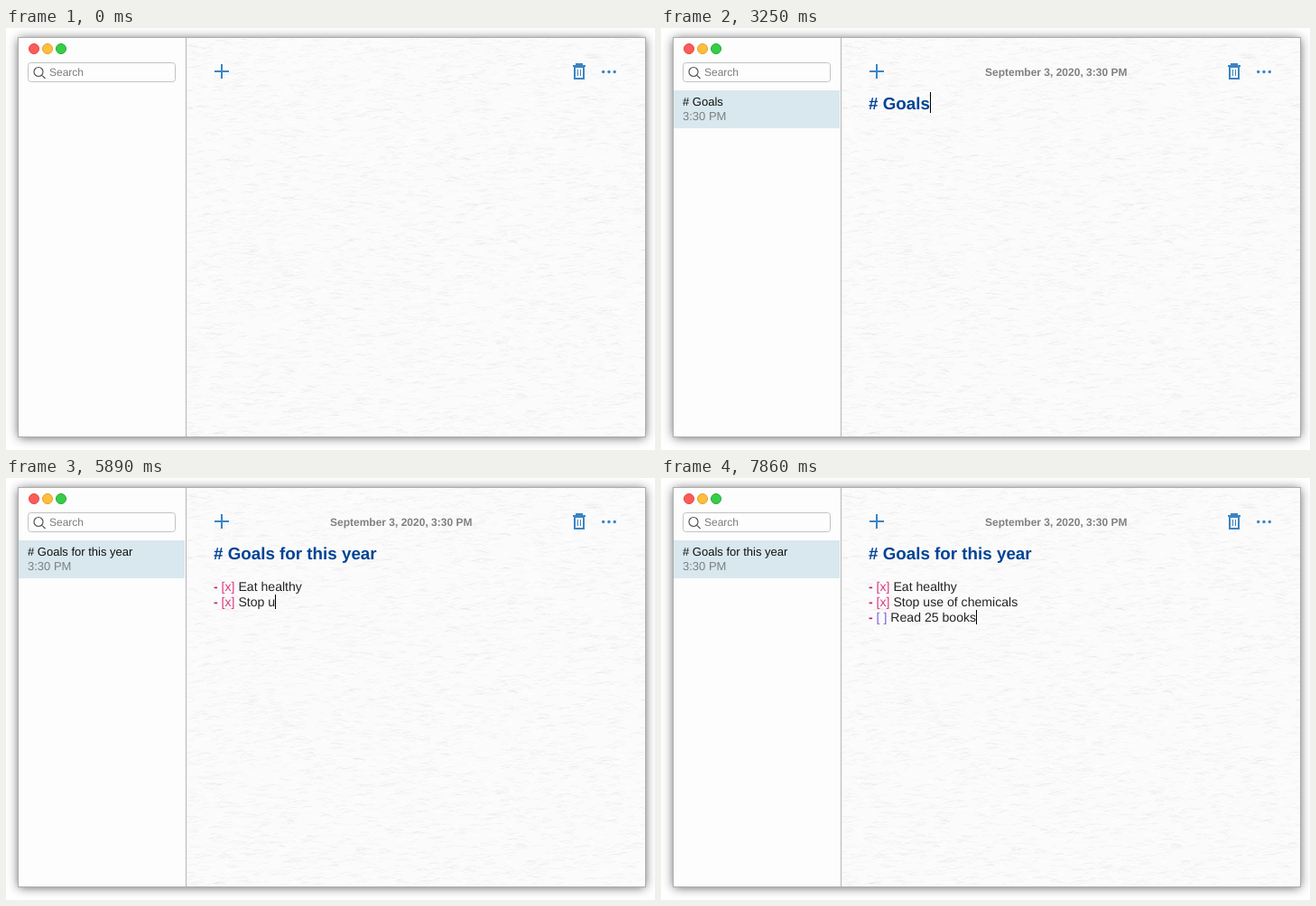
Animation, 719 px wide and 467 px high, one loop 8000 ms. Source, as an HTML page with a canvas:

```html
<!DOCTYPE html>
<html lang="en">
<head>
<meta charset="utf-8">
<title>Notes</title>
<style>
html, body { margin: 0; width: 100%; height: 100%; overflow: hidden; background: #fff; }
canvas { display: block; }
</style>
</head>
<body>
<canvas id="stage" width="719" height="467"></canvas>
<script>
const LOOP = 8000, LEFT = 230;
const BODY = 14.1, H1 = 'bold 18.8', H2 = 'bold 18';
const INK = '#242424', BLUE = '#004394', MARK = '#c4246f', DONE = '#e0357f', OPEN = '#7a5fe0', TOOL = '#3b85c3';

// Typing bursts: start, end, number of steps, text
const bursts = [
  [2910, 3660, 14, '# Goals for this'],
  [3770, 3950, 4, ' year'],
  [4130, 4130, 1, '\n'],
  [4370, 5130, 12, '\n- [x] Eat healthy'],
  [5370, 6170, 14, '\n- [x] Stop use of '],
  [6230, 6640, 8, 'chemicals'],
  [6870, 7570, 11, '\n- [ ] Read 25 '],
  [7680, 7860, 4, 'books']
];
const caretOff = [[1420, 1890], [2430, 2910], [6520, 6580]];

const ctx = document.getElementById('stage').getContext('2d');
const backdrop = document.createElement('canvas');
backdrop.width = 719;
backdrop.height = 467;

// Number of steps done at time t, of n spread evenly from a to b
function stepsDone(t, a, b, n) {
  if (t < a) return 0;
  return Math.min(n, 1 + Math.floor((t - a + 5) / ((b - a) / (n - 1) || 1)));
}

// Draws text and returns the x where it ends
function write(c, str, x, y, size, color) {
  c.font = size + 'px "Liberation Sans", Arial, sans-serif';
  c.fontKerning = 'none';
  c.textRendering = 'geometricPrecision';
  c.fillStyle = color;
  c.fillText(str, x, y);
  return x + c.measureText(str).width;
}

function box(c, x, y, w, h, color) {
  c.fillStyle = color;
  c.fillRect(x, y, w, h);
}

function disc(c, x, y, r, fill, edge) {
  c.beginPath();
  c.arc(x, y, r, 0, 7);
  c.fillStyle = fill;
  c.fill();
  if (edge) {
    c.strokeStyle = edge;
    c.lineWidth = 1;
    c.stroke();
  }
}

function drawPaper(c) {
  let seed = 7;
  const rnd = () => (seed = seed * 16807 % 2147483647) / 2147483647;
  c.save();
  c.beginPath();
  c.rect(200, 11, 508, 441);
  c.clip();
  box(c, 200, 11, 508, 441, '#fbfbfb');
  c.lineWidth = 1;
  for (let i = 0; i < 6500; i++) {
    const x = 192 + rnd() * 516, y = 11 + rnd() * 441;
    const len = 5 + rnd() * 9, rise = rnd() * 5 - 2.5;
    c.strokeStyle = i % 3 ? 'rgba(0,0,0,.03)' : 'rgba(255,255,255,.6)';
    c.beginPath();
    c.moveTo(x, y);
    c.quadraticCurveTo(x + len / 2, y - 2, x + len, y + rise);
    c.stroke();
  }
  c.restore();
}

function drawWindow(c) {
  box(c, 0, 0, 719, 467, '#fff');
  c.save();
  c.shadowColor = 'rgba(0,0,0,.65)';
  c.shadowBlur = 11;
  c.shadowOffsetY = 1;
  box(c, 14, 11, 694, 441, '#fdfdfd');
  c.restore();
  c.strokeStyle = '#adadad';
  c.strokeRect(13.5, 10.5, 695, 442);
  drawPaper(c);
  box(c, 199, 11, 1, 441, '#b4b4b4');

  disc(c, 31, 23, 5.5, '#fc5b57', '#e24640');
  disc(c, 46, 23, 5.5, '#fdbe3c', '#dfa02f');
  disc(c, 61, 23, 5.5, '#36cd48', '#25a934');

  c.beginPath();
  c.roundRect(24.5, 38.5, 163, 21, 3);
  c.strokeStyle = '#c3c3c3';
  c.stroke();
  c.beginPath();
  c.arc(36, 48.5, 5, 0, 7);
  c.moveTo(39.6, 52.1);
  c.lineTo(43.5, 56);
  c.strokeStyle = '#555';
  c.lineWidth = 1.2;
  c.stroke();
  write(c, 'Search', 48, 53, 12, '#7d7d7d');

  box(c, 231, 47, 16, 2, TOOL);
  box(c, 238, 40, 2, 16, TOOL);

  box(c, 628, 41, 14, 2, TOOL);
  c.strokeStyle = TOOL;
  c.lineWidth = 2;
  c.strokeRect(632, 40, 6, 2);
  c.strokeRect(630, 43, 10, 13);
  box(c, 633, 46, 1, 7, TOOL);
  box(c, 636, 46, 1, 7, TOOL);
  for (const x of [661.7, 668, 674.3]) disc(c, x, 48.5, 1.7, TOOL);
}

function drawItem(title, height) {
  const y = 69 + height;
  ctx.save();
  ctx.beginPath();
  ctx.rect(14, 69, 184, 42);
  ctx.clip();
  box(ctx, 14, y - 42, 184, 42, '#d9e8ee');
  write(ctx, title, 24, y - 25, 13, '#111');
  write(ctx, '3:30 PM', 24, y - 9, 13, '#7b7f81');
  ctx.restore();
}

function drawLine(line, y, big) {
  const task = line.match(/^(-)( )(?=.)(\[[ x]\](?=.))?(.*)$/);
  if (!task) return write(ctx, line, LEFT, y, BODY, INK);
  const [, dash, gap, check = '', rest] = task;
  const size = big ? H2 : BODY;
  let x = write(ctx, dash, LEFT, y, 'bold ' + BODY, MARK);
  x = write(ctx, gap, x, y, size, INK);
  x = write(ctx, check, x, y, BODY, check === '[x]' ? DONE : OPEN);
  return write(ctx, rest, x, y, size, big ? BLUE : INK);
}

function drawNote(lines, caret) {
  let top = 71, x = LEFT, height = 17, start = top;
  lines.forEach((line, i) => {
    start = top;
    if (line[0] === '#') {
      height = 24;
      x = write(ctx, line, LEFT, top + 19, H1, BLUE);
    } else {
      // A lone dash below turns the line into a heading
      const big = line && /^- ?$/.test(lines[i + 1]);
      height = big ? 22 : 17;
      x = drawLine(line, top + (big ? 18 : 13), big);
    }
    top += height;
  });
  if (caret) box(ctx, Math.round(x), start, 1, height - 1, '#000');
}

function draw(t) {
  ctx.drawImage(backdrop, 0, 0);
  const slide = stepsDone(t, 890, 1120, 5);
  if (!slide) return;
  const text = bursts.map(([a, b, n, str]) =>
    str.slice(0, Math.ceil(stepsDone(t, a, b, n) * str.length / n))).join('');
  const lines = text.split('\n');
  drawItem(lines[0] || 'New Note', Math.round(42 * (1 - (1 - slide / 5) ** 1.5)));
  if (slide > 3) write(ctx, 'September 3, 2020, 3:30 PM', 359, 53, 'bold 12', '#808080');
  drawNote(lines, slide > 1 && !caretOff.some(([a, b]) => t >= a && t < b));
}

drawWindow(backdrop.getContext('2d'));
const begin = performance.now();
function tick() {
  draw((performance.now() - begin) % LOOP);
  requestAnimationFrame(tick);
}
tick();
</script>
</body>
</html>
```
